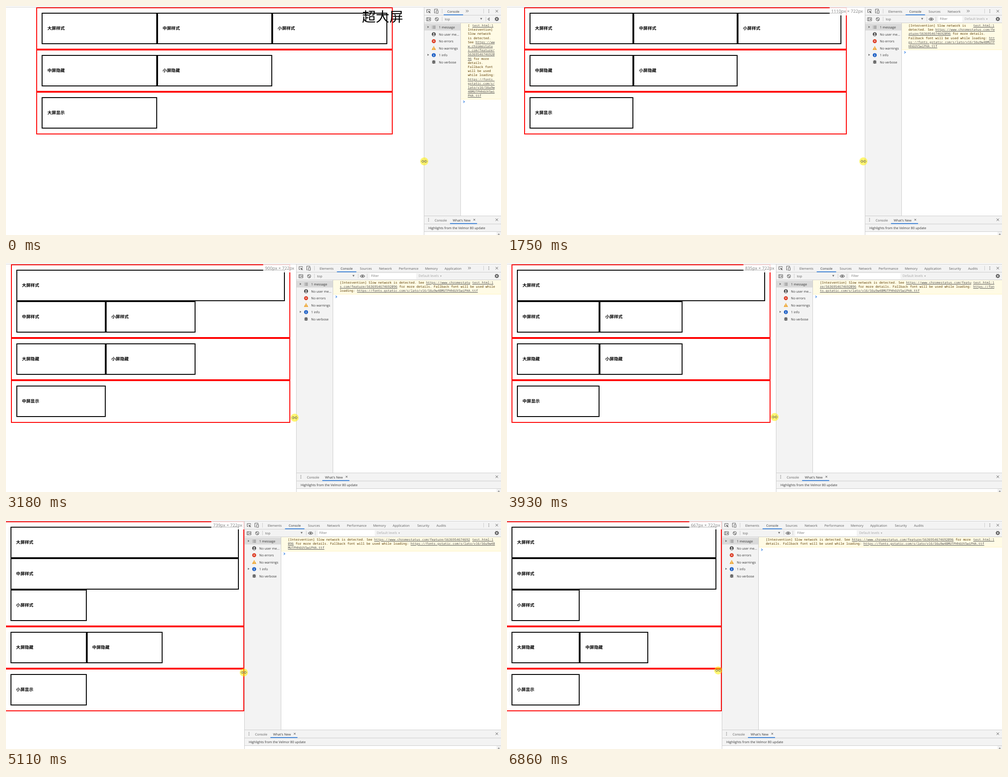
An HTML page for the animation above (6.96 s loop, 1097 by 510 pixels).

```html
<!DOCTYPE html>
<html lang="zh-CN">
<head>
<meta charset="utf-8">
<title>Responsive grid</title>
<style>
html, body { margin: 0; width: 100%; height: 100%; overflow: hidden; background: #fff; }
* { box-sizing: border-box; }
#stage { position: relative; width: 1097px; height: 510px; overflow: hidden; background: #fff;
  font: 7.2px "Open Sans", "Noto Sans", sans-serif; color: #333; text-rendering: geometricPrecision; }
#stage div, #stage svg { position: absolute; }
#stage svg { left: 0; top: 0; overflow: visible; }
#grid { top: 2.7px; }
#grid .row, #grid .box { position: static; }
.row { display: flex; flex-wrap: wrap; border: 2px solid #f00; padding: 10.15px 10px; }
.box { width: 33.3333%; height: 70px; border: 2px solid #000; padding-left: 10.3px; color: #000;
  font: bold 9.6px/65.5px "Noto Sans CJK SC", "Noto Sans CJK", sans-serif; }
.box.full { width: 100%; }
#caption { top: 0; font: 30.4px/44px "Noto Sans CJK SC", "Noto Sans CJK", sans-serif; color: #000; white-space: nowrap; }
#size { top: 3px; height: 17.5px; padding: 0 4px; font-size: 9.6px; line-height: 18px; white-space: nowrap;
  background: rgba(255,255,255,.85); color: #808080; }
#panel { top: 3px; right: 0; bottom: 0; background: #f3f3f3; border-left: 1px solid #ccc; }
#panel > svg { top: -3px; left: -1px; }
#bar { left: 38px; right: 25.5px; top: 18px; height: 16.5px; overflow: hidden; }
#bar > svg { left: -39px; top: -21px; }
#filter { left: 124px; top: 2px; height: 13px; padding-left: 3.5px; line-height: 13px; background: #fff; color: #757575; overflow: hidden; }
#levels { top: 2px; line-height: 13px; color: #a5a5a5; white-space: nowrap; }
#log { left: 80px; right: 0; top: 35px; height: 429px; background: #fff; border-left: 1px solid #ccc; }
#log > div { position: relative !important; }
#message { padding: 1.9px 13.1px 1.5px 15px; background: #fffbe5; border-bottom: 1px solid #fff3c0; color: #5c3c00;
  font: 7.092px/9.2px "Noto Sans Mono", "Liberation Mono", monospace; white-space: pre-wrap; overflow-wrap: anywhere; }
#message u { color: #545454; word-break: break-all; }
#message .src { float: right; margin: 0 3.9px 0 2.5px; white-space: nowrap; word-break: normal; }
#log > svg { position: relative !important; display: block; }
</style>
</head>
<body>
<div id="stage">
  <div style="left:0;right:0;top:2px;height:1px;background:#ccc"></div>
  <div id="grid"></div>
  <div id="caption">超大屏</div>
  <div id="size"></div>
  <div id="panel">
    <svg id="parts" width="1097" height="510"></svg>
    <div id="bar">
      <svg id="tools" width="400" height="40"></svg>
      <div id="filter">Filter</div>
      <div id="levels">Default levels <span style="font-size:5.5px">▼</span></div>
    </div>
    <div id="log">
      <div id="message"><u class="src">test.html:1</u>[Intervention] Slow network is detected. See <u>https://www.chromestatus.com/feature/5636954674692096</u> for more details. Fallback font will be used while loading: <u>https://fonts.gstatic.com/s/lato/v16/S6u9w4BMUTPHh6UVSwiPHA.ttf</u></div>
      <svg width="20" height="12"><path d="M5.5 3l2.6 2.3-2.6 2.3" fill="none" stroke="#2f7de1" stroke-width="1.2"/></svg>
    </div>
  </div>
  <svg id="right" width="1097" height="510"></svg>
  <svg width="1097" height="510"><g id="cursor">
    <circle r="9" fill="rgba(255,238,0,.55)"/>
    <path d="M-6.5 0l3.5-3v2h6v-2l3.5 3-3.5 3v-2h-6v2z" fill="#fff6a0" fill-opacity=".5" stroke="#5a5a40" stroke-width=".8"/>
  </g></svg>
</div>
<script>
const LOOP = 6960, STEPS = 75, ZOOM = 1.4, WIDTH = 1097;
const $ = id => document.getElementById(id);

// step, viewport width in page pixels, pointer offset from the divider, pointer y
const KEYS = [
  [0, 1297, .4, 346], [8, 1236, -2, 346], [12, 1207, -3.1, 346], [16, 1152, -3.1, 346],
  [24, 1040, -3.1, 346], [26, 983, -3.1, 346], [32, 917, -3.2, 345], [40, 848, -3.4, 343],
  [42, 835, -3.4, 343], [48, 787, -2, 341], [55, 739, -.9, 339.5], [62, 726, -4.1, 340],
  [64, 718, -5, 339], [72, 671, -8, 335.5], [74, 667, -8.4, 335]
];

// tab name, its offset from the divider and its end
const TABS = [["Elements", 52, 83], ["Console", 98.4, 126], ["Sources", 141.3, 168], ["Network", 183.4, 213],
  ["Performance", 227.5, 271], ["Memory", 285.8, 314], ["Application", 329, 368], ["Security", 383.5, 411],
  ["Audits", 426, 448]];

const text = (x, y, s, color = "#333") => `<text x="${x}" y="${y}" fill="${color}">${s}</text>`;
const rect = (x, y, w, h, color) => `<rect x="${x}" y="${y}" width="${w}" height="${h}" fill="${color}"/>`;
const line = (d, w = 1, color = "#5a5a5a") => `<path d="${d}" fill="none" stroke="${color}" stroke-width="${w}"/>`;
const fill = (d, color = "#5a5a5a") => `<path d="${d}" fill="${color}"/>`;
const dot = (x, y, r, color = "#5a5a5a") => `<circle cx="${x}" cy="${y}" r="${r}" fill="${color}"/>`;
const cross = (x, y, r) => line(`M${x - r} ${y - r}l${2 * r} ${2 * r}m0 ${-2 * r}l${-2 * r} ${2 * r}`);
const dots = (x, y) => [-3, 0, 3].map(d => dot(x, y + d, .8)).join("");

function sidebar() {
  const names = ["1 message", "No user me...", "No errors", "No warnings", "1 info", "No verbose"];
  const icons = [
    line("M-4-2.5h1m1 0h6M-4 0h1m1 0h6M-4 2.5h1m1 0h6", 1.1, "#6e6e6e"),
    dot(0, 0, 4.4, "#454545") + dot(0, -1.3, 1.4, "#f3f3f3") + fill("M-2.7 2.3Q0-.4 2.7 2.3Q0 4.4-2.7 2.3", "#f3f3f3"),
    dot(0, 0, 4.4, "#dc3a22") + line("M-1.6-1.6l3.2 3.2m0-3.2l-3.2 3.2", 1, "#fff"),
    fill("M0-4.5L4.8 4h-9.6z", "#eda32b") + line("M0-1.7v3m0 .8v1", 1, "#fff"),
    dot(0, 0, 4.4, "#1d5fc4") + line("M0-2.6v1.1m0 .8v3.3", 1.2, "#fff"),
    `<ellipse rx="2.5" ry="3.6" fill="#4a4a4a"/>` +
      line("M-4-2h8M-4 .2h8M-4 2.4h8M-2-4.3l1 1.2m3-1.2l-1 1.2", .9, "#4a4a4a") + line("M-1-.5h2m-2 1.6h2", .7, "#f3f3f3")
  ];
  return rect(1, 39.5, 80, 15, "#dadada") + names.map((name, i) => {
    const y = 47.3 + 15.5 * i;
    return `<g transform="translate(22 ${y})">${icons[i]}</g>` + text(33.3, y + 2.9, name) +
      (i % 4 ? "" : fill(`M8 ${y - 2.8}l3.6 2.3-3.6 2.3z`, "#6e6e6e"));
  }).join("");
}

$("parts").innerHTML =
  rect(0, 20, WIDTH, 1, "#ccc") + rect(0, 37, WIDTH, 1, "#ccc") +
  line("M14 10.5V8H6.5v6.5H9") + fill("M9.3 10.6l6 2.3-2.5 1-1 2.5z") + line("M12.3 13.5l2.7 2.7") +
  line("M25.5 15.5h-2v-8.5h7v2M27.3 10.2h4.3v6h-4.3z") + line("M40.5 6.5v10", 1, "#ccc") +
  TABS.map(([name, x]) => `<g class="tab">${text(x, 14.8, name, name == "Console" ? "#333" : "#5a5a5a")}` +
    (name == "Console" ? rect(x - 8, 18.8, 43, 1.6, "#1a6fd6") : "") + "</g>").join("") +
  `<g id="more">${line("M-2.8 8.8l2.4 2.5-2.4 2.5M.4 8.8l2.4 2.5-2.4 2.5")}</g>` +
  line("M6 26h9v7h-9zM8.6 26v7") + fill("M13.5 27.5v4l-3-2z") +
  `<circle cx="28.7" cy="29.3" r="3.6" fill="none" stroke="#5a5a5a" stroke-width="1.1"/>` + line("M26.2 26.8l5 5", 1.1) +
  sidebar() +
  rect(0, 467, WIDTH, 1, "#ccc") + rect(0, 485, WIDTH, 1, "#ccc") + rect(0, 502, WIDTH, 1, "#ccc") +
  rect(1, 503, WIDTH, 8, "#fff") + dots(10.5, 476.3) +
  text(24, 479.6, "Console", "#5a5a5a") + text(64, 479.6, "What's New") + cross(111.8, 476, 2) +
  rect(58, 483.7, 60, 1.6, "#1a6fd6") + text(10, 497.4, "Highlights from the Velmor 80 update");

$("tools").innerHTML = line("M40.5 24v10M137.5 24v10M157.5 24v10", 1, "#ccc") +
  text(46.5, 32, "top", "#5a5a5a") + fill("M124.8 26.8h4.6l-2.3 4z", "#6e6e6e") +
  line("M142 29.3Q147 23.3 152 29.3Q147 35.3 142 29.3z", 1.1) + dot(147, 29.3, 1.8);

$("right").innerHTML = line("M1058.5 6.5v10", 1, "#ccc") + dots(1070, 11.5) +
  cross(1087.7, 11.5, 2.7) + cross(1087.7, 476, 2.7) +
  `<circle cx="1087.7" cy="29" r="2.7" fill="none" stroke="#5a5a5a" stroke-width="2"/>
   <circle cx="1087.7" cy="29" r="4.1" fill="none" stroke="#5a5a5a" stroke-width="1.4" stroke-dasharray="1.6 1.62"/>` +
  rect(1087, 503, 10, 7, "#f1f1f1") + fill("M1089.5 509.5l2.5-3 2.5 3z", "#8a8a8a");

// size: 0 large, 1 medium, 2 small
function buildGrid(size) {
  const names = ["大屏", "中屏", "小屏"];
  const box = (s, full) => `<div class="box${full ? " full" : ""}">${s}</div>`;
  const row = s => `<div class="row">${s}</div>`;
  $("grid").innerHTML =
    row(names.map((n, i) => box(n + "样式", i < size)).join("")) +
    row(names.filter((n, i) => i != size).map(n => box(n + "隐藏")).join("")) +
    row(box(names[size] + "显示"));
}

function layoutTabs(x) {
  const all = TABS.length;
  let count = TABS.filter(tab => x + tab[2] + 8 <= 1042).length;
  if (x + TABS[all - 1][2] + 8 <= 1056) count = all;
  const single = count < 2;
  document.querySelectorAll(".tab").forEach((tab, i) => {
    tab.style.display = (single ? i == 1 : i < count) ? "" : "none";
    tab.setAttribute("transform", `translate(${single ? TABS[0][1] - TABS[1][1] : 0})`);
  });
  $("more").style.display = count == all ? "none" : "";
  $("more").setAttribute("transform", `translate(${(single ? 80 : TABS[count - 1][2]) + 16})`);
}

function pose(step) {
  const i = Math.max(1, KEYS.findIndex(k => k[0] >= step));
  const a = KEYS[i - 1], b = KEYS[i], u = (step - a[0]) / (b[0] - a[0]);
  return [1, 2, 3].map(j => a[j] + (b[j] - a[j]) * u);
}

let shownSize = -1, shownStep = -1;
function draw(step) {
  const [raw, dx, y] = pose(step), view = Math.round(raw), x = view / ZOOM;
  const size = view >= 960 ? 0 : view >= 768 ? 1 : 2, huge = view >= 1280;
  if (size != shownSize) buildGrid(shownSize = size);
  const margin = x * (huge ? .075 : [.05, .02, 0][size]);
  $("grid").style.left = margin - 2 + "px";
  $("grid").style.width = x - 2 * margin + 2 + "px";
  $("caption").style.display = huge ? "" : "none";
  $("caption").style.right = WIDTH - x * .95 + "px";
  $("size").style.display = step ? "" : "none";
  $("size").style.right = WIDTH - x + "px";
  $("size").textContent = `${view}px × 722px`;
  $("panel").style.left = x + "px";
  layoutTabs(x);
  const room = 1078 - x - 163, w = Math.max(0, Math.min(.43 * room + .6, 50 + .196 * room));
  $("filter").style.width = w + "px";
  $("levels").style.left = 129 + w + "px";
  $("cursor").setAttribute("transform", `translate(${x + dx} ${y})`);
}

function tick() {
  const t = performance.now() % LOOP;
  const step = Math.min(STEPS - 1, Math.floor((t + 20) / (LOOP / STEPS)));
  if (step != shownStep) draw(shownStep = step);
  requestAnimationFrame(tick);
}
tick();
</script>
</body>
</html>
```
